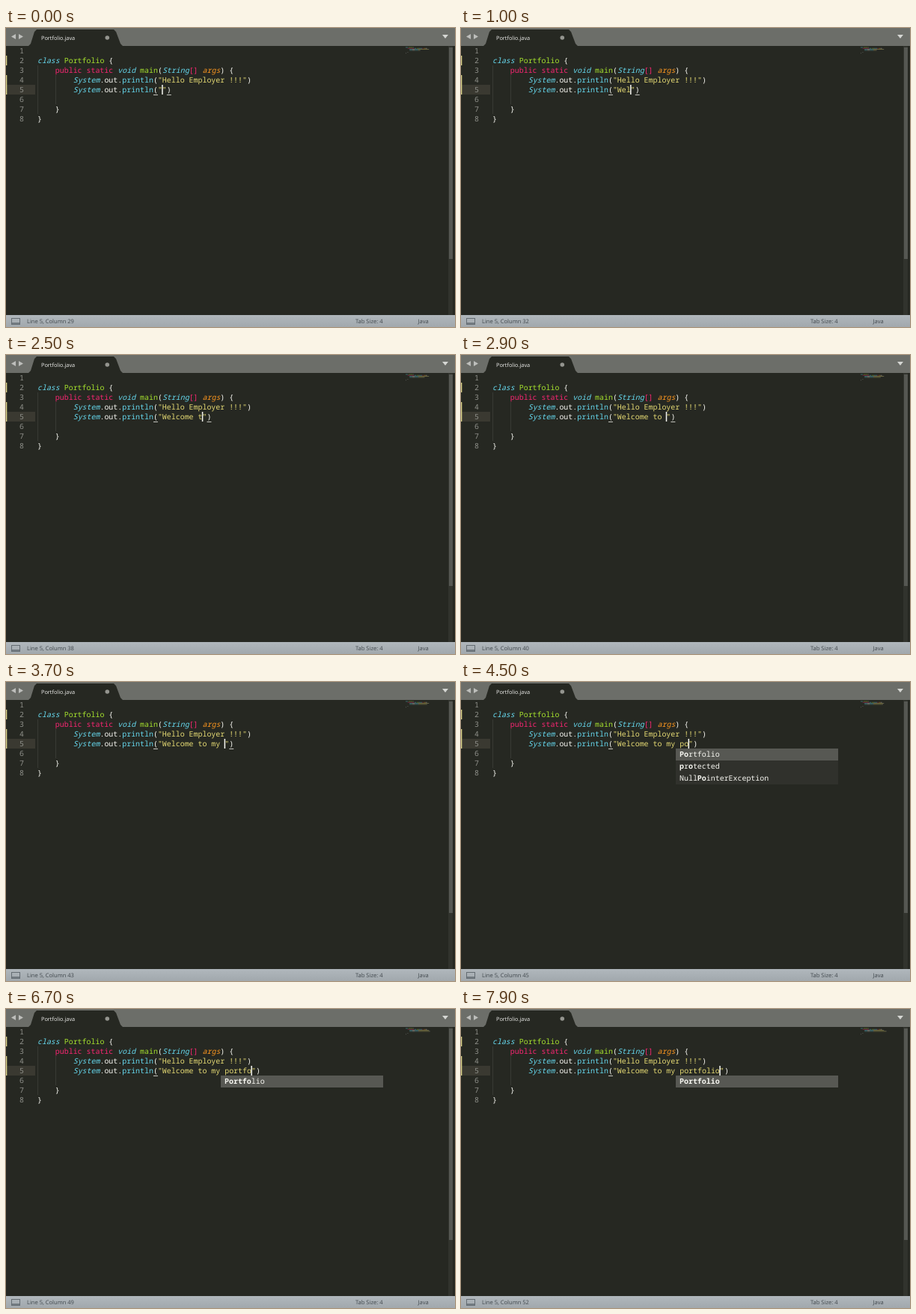
Recreate the animation shown at these times as an HTML page with a canvas. Size 600 px wide and 400 px high, loop 8000 ms.

```html
<!DOCTYPE html>
<html lang="en">
<head>
<meta charset="utf-8">
<title>Typing in a code editor</title>
<style>
  html, body { margin: 0; width: 100%; height: 100%; overflow: hidden; background: #262822; }
  canvas { display: block; width: 600px; height: 400px; }
</style>
</head>
<body>
<canvas id="stage"></canvas>
<script>
const LOOP = 8000;
const MESSAGE = 'Welcome to my portfolio';
// Moment in ms at which each character of MESSAGE is typed.
const KEY_TIMES = [300, 600, 900, 1200, 1500, 1800, 2000, 2300, 2500, 2700, 2900, 3200,
  3400, 3600, 4000, 4400, 4700, 5000, 5800, 6600, 7000, 7400, 7800];
const WORD_START = MESSAGE.lastIndexOf(' ') + 1;

const LEFT = 42, CHAR = 5.96, ROW = 13, TOP = 24;
const MONO = '"Noto Sans Mono", "DejaVu Sans Mono", monospace';
const UI = '"Open Sans", "Noto Sans", sans-serif';
const WHITE = '#f8f8f2', CYAN = '#66d9ef', PINK = '#f92672',
  GREEN = '#a6e22e', ORANGE = '#fd971f', YELLOW = '#e6db74';

// Completion entries with the positions of the letters matching "portfolio".
const COMPLETIONS = [
  { label: 'Portfolio', marks: [0, 1, 2, 3, 4, 5, 6, 7, 8] },
  { label: 'protected', marks: [0, 2, 1, 3] },
  { label: 'NullPointerException', marks: [4, 5, 10, 16] }
];

const canvas = document.getElementById('stage');
const ctx = canvas.getContext('2d');
const scale = window.devicePixelRatio || 1;
canvas.width = 600 * scale;
canvas.height = 400 * scale;

const columnX = col => LEFT + col * CHAR;
const rowY = row => TOP + (row - 1) * ROW;

function rect(x, y, w, h, color) {
  ctx.fillStyle = color;
  ctx.fillRect(x, y, w, h);
}

function polygon(color, ...points) {
  ctx.fillStyle = color;
  ctx.beginPath();
  points.forEach(([x, y]) => ctx.lineTo(x, y));
  ctx.fill();
}

function text(value, x, y, color, font) {
  ctx.font = font;
  ctx.fillStyle = color;
  ctx.fillText(value, x, y);
}

const code = (value, x, y, color, style = '') =>
  text(value, x, y, color, `${style} 9.93px ${MONO}`);

function printLine(message) {
  return [8, ['System', CYAN, 'italic'], ['.out.', WHITE], ['println', CYAN],
    ['(', WHITE], [`"${message}"`, YELLOW], [')', WHITE]];
}

// Each line: indent, then [text, colour, style] tokens.
function sourceLines(typed) {
  return {
    2: [0, ['class', CYAN, 'italic'], [' Portfolio', GREEN], [' {', WHITE]],
    3: [4, ['public static', PINK], [' void', CYAN, 'italic'], [' main', GREEN], ['(', WHITE],
      ['String', CYAN, 'italic'], ['[]', PINK], [' args', ORANGE, 'italic'], [') {', WHITE]],
    4: printLine('Hello Employer !!!'),
    5: printLine(typed),
    7: [4, ['}', WHITE]],
    8: [0, ['}', WHITE]]
  };
}

function drawTabBar() {
  rect(0, 0, 600, 24, '#6c6e69');
  polygon('#262822', [30, 24], [33, 21], [38, 5], [41, 2], [144, 2], [147, 5], [153, 21], [156, 24]);
  polygon('#bdbebb', [7, 11.5], [13, 8], [13, 15]);
  polygon('#bdbebb', [23, 11.5], [17, 8], [17, 15]);
  polygon('#d5d6d3', [583, 9], [591, 9], [587, 14]);
  text('Portfolio.java', 47, 16, '#f0f0ee', `7.35px ${UI}`);
  ctx.fillStyle = '#94958f';
  ctx.beginPath();
  ctx.arc(135.3, 13, 2.8, 0, 7);
  ctx.fill();
}

function drawGutter() {
  rect(0, rowY(5), 39, ROW, '#3a3931');
  rect(0, rowY(2), 1.3, ROW, '#d9d288');
  rect(0, rowY(4), 1.3, 2 * ROW, '#d9d288');
  for (let row = 1; row <= 8; row++) code(row, 18, rowY(row) + 10.2, '#8f908a');
  rect(LEFT, rowY(3), 1, 5 * ROW, '#383a34');
  rect(66, rowY(4), 1, 3 * ROW, '#383a34');
}

function drawCode(lines) {
  for (const [row, [indent, ...tokens]] of Object.entries(lines)) {
    let col = indent;
    for (const [value, color, style] of tokens) {
      const body = value.trimStart();
      col += value.length - body.length;
      code(body, columnX(col), rowY(row) + 10.2, color, style);
      ctx.globalAlpha = 0.38;
      rect(534 + col * 0.65, 24.2 + (row - 1) * 1.3, body.length * 0.65, 0.9, color);
      ctx.globalAlpha = 1;
      col += body.length;
    }
  }
}

function drawCaret(count) {
  const col = 28 + count;
  rect(columnX(26), 89, CHAR, 1, '#c5c5bf');
  rect(columnX(col + 1), 89, CHAR, 1, '#c5c5bf');
  rect(columnX(col) - 0.7, rowY(5), 1.5, ROW, WHITE);
}

function drawCompletions(matched) {
  if (matched < 1) return;
  COMPLETIONS.filter(({ marks }) => marks.length >= matched).forEach(({ label, marks }, i) => {
    const y = 89 + i * 16;
    const bold = marks.slice(0, matched);
    rect(287, y, 217, 16, i ? '#30312c' : '#575853');
    [...label].forEach((letter, k) =>
      code(letter, 292 + k * CHAR, y + 11, WHITE, bold.includes(k) ? 'bold' : ''));
  });
}

function drawStatusBar(column) {
  const shade = ctx.createLinearGradient(0, 384, 0, 400);
  shade.addColorStop(0, '#b0b7bc');
  shade.addColorStop(1, '#a1a8ad');
  rect(0, 384, 600, 16, shade);
  const font = `7.55px ${UI}`, ink = '#41484d';
  ctx.strokeStyle = '#646c72';
  ctx.lineWidth = 1;
  ctx.strokeRect(7.5, 388.5, 11, 8);
  rect(8, 394, 10, 2, '#747c82');
  text(`Line 5, Column ${column}`, 28, 395, ink, font);
  text('Tab Size: 4', 467, 395, ink, font);
  text('Java', 550.5, 395, ink, font);
}

function draw(time) {
  const count = KEY_TIMES.filter(key => key <= time).length;
  ctx.setTransform(scale, 0, 0, scale, 0, 0);
  ctx.textRendering = 'geometricPrecision';
  rect(0, 0, 600, 400, '#262822');
  drawTabBar();
  drawGutter();
  rect(591, 24, 6, 360, '#31332d');
  rect(592, 26, 5, 283, '#555752');
  drawCode(sourceLines(MESSAGE.slice(0, count)));
  drawCaret(count);
  drawCompletions(count - WORD_START);
  drawStatusBar(29 + count);
}

const start = performance.now();
function tick() {
  draw((performance.now() - start) % LOOP);
  requestAnimationFrame(tick);
}
tick();
</script>
</body>
</html>
```
